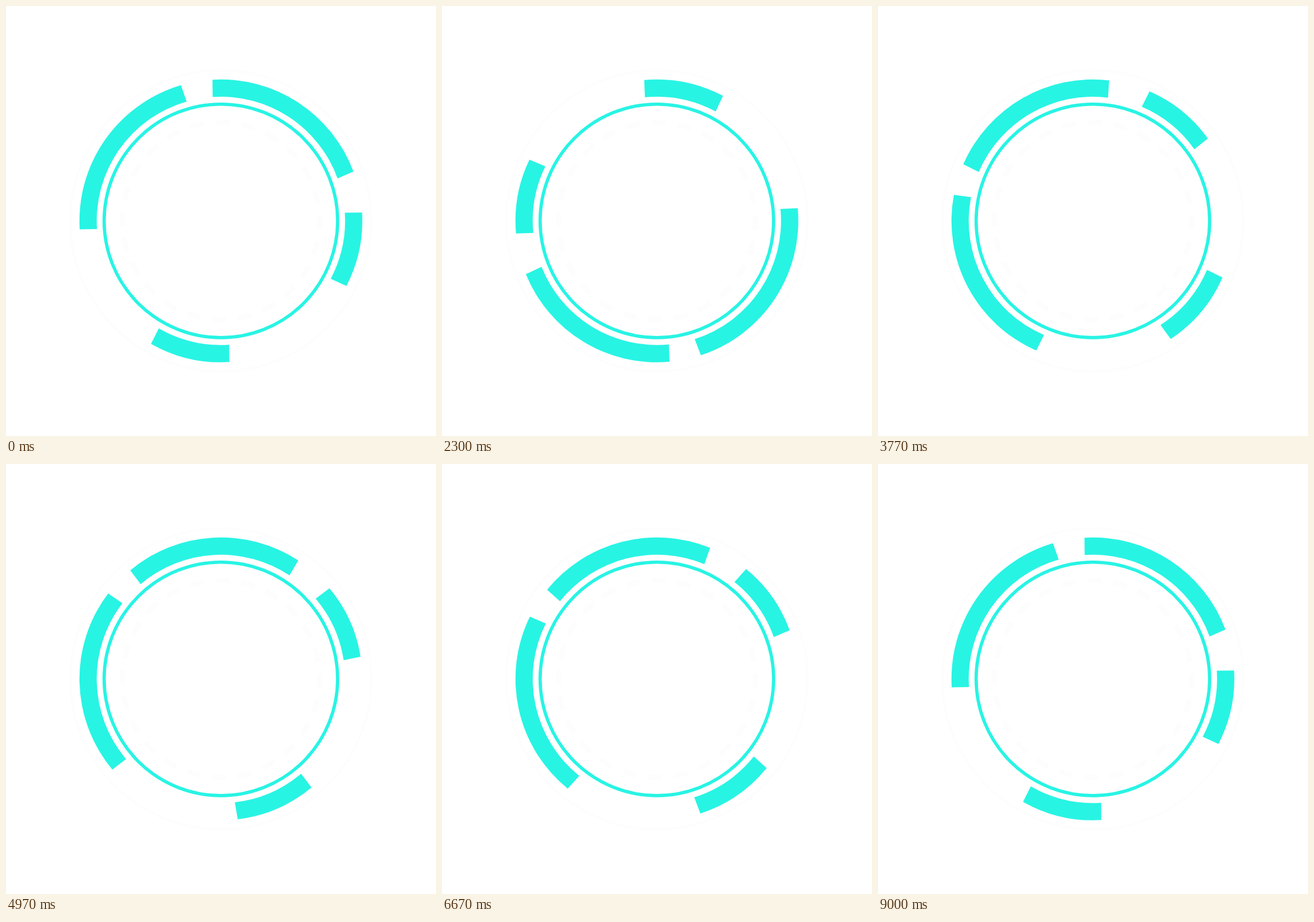
An HTML page for the animation above (9.03 s loop, 748 by 748 pixels).

```html
<!DOCTYPE html>
<html lang="en">
<head>
<meta charset="utf-8">
<title>Rotating ring</title>
<style>
  html, body { margin: 0; width: 100%; height: 100%; overflow: hidden; background: #fff; }
  svg { display: block; width: 100%; height: 100%; }
</style>
</head>
<body>
<svg viewBox="0 0 748 748">
  <g transform="translate(373.8 373.8)" fill="none">
    <circle r="262" stroke="#fdfdfd" stroke-width="4"/>
    <circle r="171.5" stroke="#fdfdfd" stroke-width="9" pathLength="360" stroke-dasharray="8 7" transform="rotate(-3)"/>
    <circle r="203.1" stroke="#28f4e4" stroke-width="5.6"/>
    <path id="arcs" fill="#28f4e4"/>
  </g>
</svg>
<script>
const LOOP = 9030, FRAME = 100 / 3;
const HALF = 4533; // the ring turns clockwise, then back
const TURNS = 720;
const OUTER = 246, INNER = 216;
const FLARE = 0.4; // the inner edge of each arc is slightly longer, in degrees

const arcs = document.getElementById('arcs');

function point(r, deg) {
  const a = deg * Math.PI / 180;
  return `${(r * Math.cos(a)).toFixed(2)} ${(r * Math.sin(a)).toFixed(2)}`;
}

// arcs start a quarter turn apart and differ only in length
function arcPath(length, i) {
  const from = -93.4 + 90 * i, to = from + length;
  return `M${point(OUTER, from)}A${OUTER} ${OUTER} 0 0 1 ${point(OUTER, to)}` +
    `L${point(INNER, to + FLARE)}A${INNER} ${INNER} 0 0 0 ${point(INNER, from - FLARE)}Z`;
}

// cubic Bezier easing with level ends
function bezier(x1, x2) {
  return x => {
    if (x <= 0 || x >= 1) return x <= 0 ? 0 : 1;
    let lo = 0, hi = 1;
    for (let i = 0; i < 30; i++) {
      const u = (lo + hi) / 2, v = 1 - u;
      if (3 * x1 * u * v * v + 3 * x2 * u * u * v + u * u * u < x) lo = u;
      else hi = u;
    }
    return lo * lo * (3 - 2 * lo);
  };
}

const drift = bezier(0.711, 0.43);
const spin = bezier(0.433, 0.477);

// drift to a resting angle, pause, then spin to the end
function sweep(ms, from, rest, to, spinStart, spinEnd) {
  return from + (rest - from) * drift(ms / 1417) +
    (to - rest) * spin((ms - spinStart) / (spinEnd - spinStart));
}

function angleAt(ms) {
  return ms < HALF
    ? sweep(ms, 0, 126.5, TURNS, 1740, 4500)
    : sweep(ms - HALF, TURNS, 320.5, 0, 1837, 4467);
}

function draw() {
  const ms = performance.now() % LOOP;
  const step = Math.floor((ms + 4) / FRAME) * FRAME;
  arcs.setAttribute('transform', `rotate(${angleAt(step).toFixed(3)})`);
  requestAnimationFrame(draw);
}

arcs.setAttribute('d', [73, 30.8, 33, 77].map(arcPath).join(''));
draw();
</script>
</body>
</html>
```
